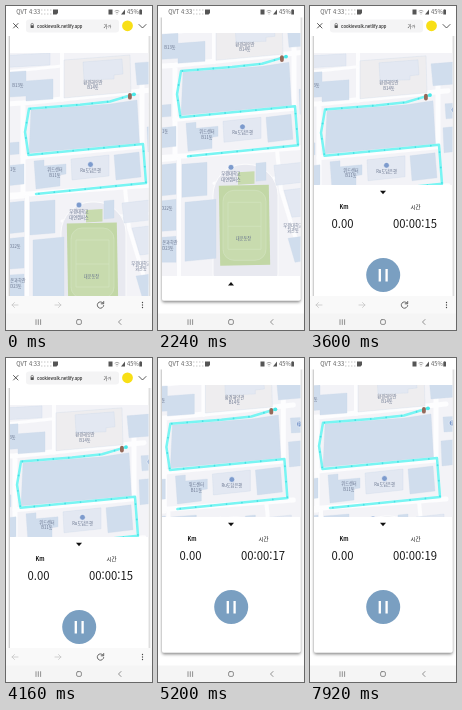
An HTML page for the animation above (8000 ms loop, 146 by 324 pixels).

```html
<!DOCTYPE html>
<html lang="ko">
<head>
<meta charset="utf-8">
<title>Walk tracker</title>
<style>
html, body { margin: 0; width: 100%; height: 100%; overflow: hidden; background: #fff; }
svg { display: block; width: 100vw; height: 100vh; }
text { font-family: "Noto Sans CJK KR", "Noto Sans CJK", "Noto Sans", sans-serif; }
.mid text { text-anchor: middle; }
.label { font-size: 4.2px; font-weight: 500; fill: #66728c; }
.ui { font-family: Roboto, "Noto Sans CJK KR", sans-serif; }
.line { fill: none; stroke-linecap: round; stroke-linejoin: round; }
</style>
</head>
<body>
<svg viewBox="0 0 146 324" preserveAspectRatio="none">
  <defs>
    <clipPath id="mapClip"><rect id="mapBox" x="4" y="47" width="138.500" height="243"/></clipPath>
    <clipPath id="cardClip"><rect x="4" y="0" width="139" height="313"/></clipPath>
    <filter id="shade" x="-10%" y="-10%" width="120%" height="120%">
      <feDropShadow dx="0" dy="1.6" stdDeviation="1.6" flood-color="#000" flood-opacity=".5"/>
    </filter>
  </defs>
  <rect width="146" height="324" fill="#fff"/>

  <g id="page">
    <rect x="4" y="-10" width="138.500" height="324.500" rx="2" fill="#fff" filter="url(#shade)"/>
    <g clip-path="url(#mapClip)">
      <g id="map">
        <rect x="-60" y="-20" width="280" height="400" fill="#f3f3f7"/>
        <g id="roads" class="line" stroke="#fdfdfe"></g>
        <rect x="55" y="196" width="65" height="140" rx="31" fill="#e8e9f0" stroke="#fbfbfc"/>
        <g id="blocks" stroke="#c9d5e8" stroke-width=".3"></g>
        <g id="field">
          <path d="M80 204L96.500 203V215.500L80 216.500Z" fill="#c8dbae"/>
          <rect x="61.500" y="217" width="50" height="80" fill="#c2d7a6" transform="rotate(-1 86 257)"/>
          <rect x="65" y="222" width="43" height="70" rx="11" fill="#c8dbae" stroke="#d6e4c4" stroke-width=".6"/>
          <path d="M70 234H103V281H70ZM70 258H103" fill="none" stroke="#d6e4c4" stroke-width=".5"/>
        </g>
        <g id="spots" stroke="#fff" stroke-width=".6" fill="#7d9bcd"></g>
        <g id="labels" class="label mid"></g>
        <path id="route" class="line" stroke="#78f5f3" stroke-width="2.500"/>
        <g id="dots" fill="#48e0e4"></g>
        <circle cx="128" cy="88.300" r="1.900" fill="#48e8e8"/>
        <rect x="122" y="87" width="3.800" height="6.600" rx="1.900" fill="#94695a"/>
      </g>
    </g>
    <g clip-path="url(#cardClip)">
      <g id="panel">
        <path id="caret" fill="#111"/>
        <g id="stats" class="mid" fill="#161616">
          <g font-size="5.500" font-weight="700">
            <text x="34" y="203">Km</text>
            <text x="105.500" y="203" font-weight="500">시간</text>
          </g>
          <g font-size="11.300">
            <text x="32.500" y="222">0.00</text>
            <text id="clock" x="105" y="222"></text>
          </g>
          <circle cx="73.200" cy="269" r="17" fill="#7a9fc1"/>
          <path d="M69.800 263V275.500M76.600 263V275.500" stroke="#fff" stroke-width="2.300"/>
        </g>
      </g>
    </g>
  </g>

  <g id="address">
    <rect y="10" width="146" height="20" fill="#fff"/>
    <rect x="20" y="13.500" width="93" height="13" rx="3" fill="#f4f4f5"/>
    <g class="line" stroke="#303030" stroke-width=".8">
      <path d="M7.500 17.500L12 22M12 17.500L7.500 22M133 18.500L136.500 22L140 18.500"/>
      <path d="M25 19.300V18.600A1.200 1.200 0 0 1 27.400 18.600V19.300" stroke-width=".5"/>
    </g>
    <rect x="24.600" y="19.300" width="3.200" height="2.700" rx=".4" fill="#555"/>
    <text class="ui" x="31" y="21.700" font-size="4.550" font-weight="500" fill="#404040">cookiewalk.netlify.app</text>
    <text x="97.500" y="22" font-size="4.600" fill="#333">가<tspan font-size="3.800">가</tspan></text>
    <circle cx="121.500" cy="19.800" r="5.400" fill="#f8df16"/>
  </g>

  <g id="toolbar">
    <rect y="290" width="146" height="20" fill="#f9f9f9"/>
    <g class="line" stroke="#c6c6c6" stroke-width=".8">
      <path d="M12 299H6M8.500 296.500L6 299L8.500 301.500M49 299H55M52.500 296.500L55 299L52.500 301.500"/>
      <path d="M97 297A3.200 3.200 0 1 0 97.700 299.500M97.700 295.500V297.800H95.200" stroke="#444"/>
    </g>
    <g fill="#444">
      <circle cx="136.500" cy="296.500" r=".65"/><circle cx="136.500" cy="299" r=".65"/><circle cx="136.500" cy="301.500" r=".65"/>
    </g>
  </g>

  <rect width="146" height="11.500" fill="#fff"/>
  <g class="ui" font-size="5.800" fill="#5a5a5a">
    <text x="10.300" y="8.100">QVT 4:33</text>
    <text x="121" y="8.100">45%</text>
  </g>
  <g class="line" stroke="#8a8a8a" stroke-width=".55">
    <path d="M35.500 4H36M38.500 4H39M35.500 8H36M38.500 8H39M41.500 4H42M44.500 4H45M41.500 8H42M44.500 8H45"/>
    <path d="M109 5Q111 3.300 113 5M110 6.500Q111 5.700 112 6.500M111 8V8.100" stroke="#666"/>
  </g>
  <path d="M47 3.500H52V7L50.500 8.500H47ZM102.500 3.500H106.500V8.500H102.500ZM115 8.500L119 3.500V8.500ZM133.300 3.800H134.200V3.200H135.200V3.800H136V8.600H133.300Z" fill="#555"/>

  <rect y="307.500" width="146" height="16.500" fill="#f5f5f5"/>
  <g class="line" stroke="#777" stroke-width=".8">
    <path d="M30 313.700V318.500M32.300 313.700V318.500M34.600 313.700V318.500M115 313.500L112.500 316L115 318.500"/>
    <rect x="70.600" y="313.600" width="4.800" height="4.800" rx="1.400"/>
  </g>
</svg>

<script>
const LOOP = 8000;
const $ = id => document.getElementById(id);

function add(parent, tag, attrs, text) {
  const el = document.createElementNS('http://www.w3.org/2000/svg', tag);
  for (const key in attrs) el.setAttribute(key, attrs[key]);
  if (text) el.textContent = text;
  $(parent).append(el);
}

for (const [d, width] of [
  ['M-30 100L17 97L17 190L-30 194M17 97L146 84', 5],
  ['M17 151L136 140L136 60M-20 191L146 179', 5],
  ['M56 40V94M21 190V310M119 182L123 222L150 310', 4],
  ['M56 215L150 207M0 66L56 60', 3],
]) add('roads', 'path', { d, 'stroke-width': width });

const blue = '#d0dded', pale = '#e3e8f2', warm = '#eeedef';
for (const [fill, d] of [
  [blue, 'M25 104L104 98L131 94L133.500 137L23 147Z'],
  [blue, 'M-10 67L20 65V75L47 73V93L20 95V90L-10 92Z'],
  [pale, 'M-10 50L44 47V59L-10 62Z'],
  [warm, 'M58 54L124 49L125 86L58 92Z'],
  [pale, 'M77 56L116 53L117 68L108 69V73L78 74Z'],
  [blue, 'M129 57L155 55V77L131 79Z'],
  [blue, 'M143 97L160 96V111L144 112ZM141 121L160 119V144L142 146Z'],
  [blue, 'M-10 138L13 136V148L-10 150ZM-10 161L18 158V178L-10 181Z'],
  [blue, 'M28 155L38 154V160L60 158V168L54 169V180L30 183Z'],
  [pale, 'M65 153L103 149V170L66 174Z'],
  [blue, 'M108 149L133 146L135 171L110 174Z'],
  [blue, 'M-10 198L18 195V226L-10 229ZM-10 234L18 231V262L-10 264ZM-10 270L18 268V294H-10Z'],
  [blue, 'M24 196L49 194V227L24 229ZM27 234L58 231V290L27 293Z'],
  [blue, 'M98 195L108 194V212L98 213Z'],
  [pale, 'M116 197L144 194V214L118 217ZM126 222L160 218V246L134 249Z'],
  [blue, 'M130 270L160 266V290L137 294Z'],
]) add('blocks', 'path', { fill, d });

for (const [x, y] of [[84.5, 158.5], [73, 199], [152, 103]])
  add('spots', 'circle', { cx: x, cy: y, r: 2.9 });
add('labels', 'text', { x: 152, y: 104.5, fill: '#fff' }, 'P');

for (const [x, y, text] of [
  [87, 77.5, '환경해양관'], [87, 82.8, 'B14동'], [12, 80.5, 'B13동'],
  [49, 165, '위드센터'], [49, 170.5, 'B11동'], [84.5, 166, 'Ru도담은행'],
  [7, 164.5, '1동'], [73, 206.5, '부경대학교'], [73, 212.5, '대연캠퍼스'],
  [85.5, 272, '대운동장'], [9, 242, 'D22동'], [10, 276, '가온과학관'],
  [10, 281.5, 'D23동'], [135, 258.5, '부경대학교'], [135, 264, '회관동'],
]) add('labels', 'text', { x, y }, text);

const route = $('route');
route.setAttribute('d', 'M128 88.300L104 95.500L74 98.700L23 102.800L19 126L22.500 149L137 138L140 177L30 188');
for (let s = 12, end = route.getTotalLength(); s < end; s += 15.5) {
  const p = route.getPointAtLength(s);
  add('dots', 'circle', { cx: p.x, cy: p.y, r: .9 });
}

// Eased value at time t from [time, value] steps
function track(t, steps) {
  let [t0, v0] = steps[0];
  for (const [t1, v1] of steps) {
    if (t < t1) {
      const k = Math.max(0, (t - t0) / (t1 - t0));
      return v0 + (v1 - v0) * k * k * (3 - 2 * k);
    }
    [t0, v0] = [t1, v1];
  }
  return v0;
}

const scroll = [[0, 0], [1440, 0], [1760, -20], [3360, -20], [3560, 0], [4240, 0], [4480, -20]];
const panX = [[0, 0], [2880, 0], [3280, -8], [4240, -8], [4720, -14], [5360, -10]];
const panY = [[0, 0], [880, .6], [1440, .6], [2000, -17.7], [3360, -17.7], [3600, .8],
  [4240, .8], [4720, -11.5], [5360, -18]];
const panel = [[0, 0], [2880, 0], [3200, 1]];
const move = (id, x, y) => $(id).setAttribute('transform', `translate(${x} ${y})`);

function draw(t) {
  const shift = track(t, scroll), open = track(t, panel);
  const drop = 111 * (1 - open);
  move('page', 0, shift);
  move('address', 0, shift);
  move('toolbar', 0, -shift);
  move('map', track(t, panX), track(t, panY));
  move('panel', 0, drop);
  $('mapBox').setAttribute('height', 132 + drop);
  $('stats').setAttribute('opacity', open);
  $('caret').setAttribute('d', open > .5 ? 'M70 184.800H76L73 188.200Z' : 'M70 188.500H76L73 185.100Z');
  $('clock').textContent = '00:00:' + (12 + Math.floor((t - 200) / 1000));
}

const start = performance.now();
function frame(now) {
  draw(Math.max(0, now - start) % LOOP);
  requestAnimationFrame(frame);
}
draw(0);
requestAnimationFrame(frame);
</script>
</body>
</html>
```
